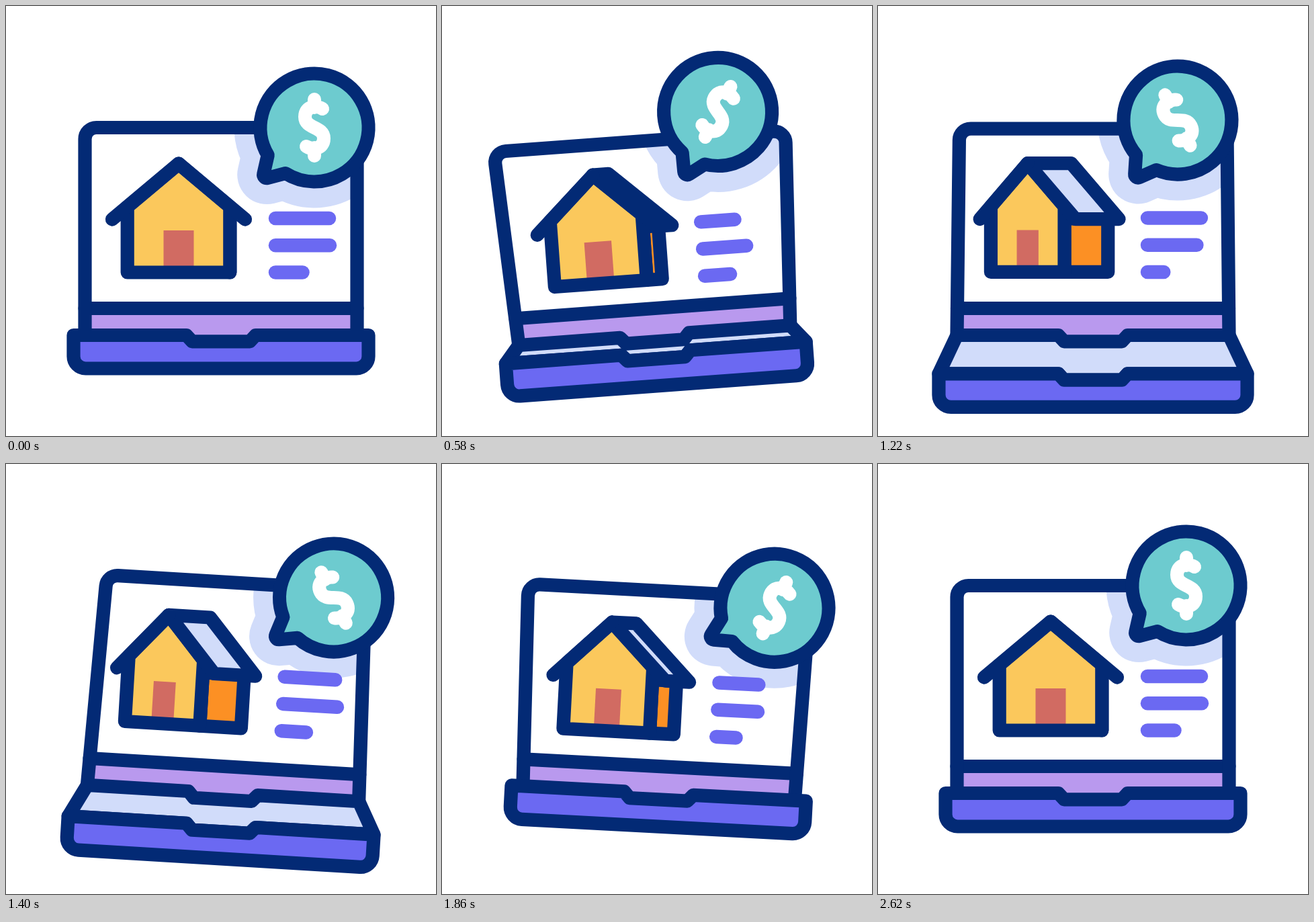
Recreate the animation shown at these times as an HTML page with a canvas. Size 640 by 640 pixels, loop 3000 ms.

```html
<!DOCTYPE html>
<html lang="en">
<head>
<meta charset="utf-8">
<title>Home price on a laptop</title>
<style>
html, body { margin: 0; width: 100%; height: 100%; overflow: hidden; background: #fff; }
canvas { display: block; width: 100vw; height: 100vh; }
</style>
</head>
<body>
<canvas id="stage" width="640" height="640"></canvas>
<script>
const ctx = document.getElementById('stage').getContext('2d');
const LOOP = 3000, RAD = Math.PI / 180, PEN = 20.2;
const NAVY = '#032a75', PURPLE = '#6b69f2', LILAC = '#b999ee', PALE = '#d1dcfa',
  TEAL = '#6dcbcf', YELLOW = '#fbc85c', ORANGE = '#fc9024', DOOR = '#d16b62';

// Cosine ease through a few poses, each [time, value]; starts from zero.
const ease = (start, ...poses) => t => {
  let from = start, value = 0;
  for (const [to, next] of poses) {
    if (t < to) {
      const u = Math.max(0, (t - from) / (to - from));
      return value + (next - value) * (1 - Math.cos(Math.PI * u)) / 2;
    }
    from = to;
    value = next;
  }
  return value;
};

// Laptop: a lean to each side, the lid's perspective, the keyboard depth
const tilt = ease(200, [800, -5.95], [1600, 5.05], [2200, 0]);
const flare = ease(200, [800, 21.5], [1400, -9.7], [2000, 10], [2620, 0]);
const drop = ease(200, [800, 27.5], [1400, -5], [2000, 10], [2620, 0]);
const depth = ease(200, [920, 47.5], [1240, 57.5], [1840, 0]);
// The bubble follows the lean a little later; the coin sign swings by itself
const sway = ease(200, [900, -24.6], [1700, 19.8], [2300, 0]);
const coin = ease(200, [750, 34], [1300, -29.5], [1900, 25], [2600, 0]);
const turn = ease(240, [1080, 1], [1200, 1], [2620, 0]);

// Each text bar shrinks twice, the lower ones later
const bars = [80, 81, 40.5].map((len, i) => {
  const dip = 17 + len * 0.23, late = i * 140;
  const cut = ease(200 + late, [720 + late, dip], [1240 + late, 0], [1790 + late, dip * 0.62], [2340 + late, 0]);
  return t => len - cut(t);
});

function line(points, close) {
  ctx.beginPath();
  points.forEach(([x, y]) => ctx.lineTo(x, y));
  if (close) ctx.closePath();
}
function fill(color) {
  ctx.fillStyle = color;
  ctx.fill();
}
function stroke(color = NAVY, width = PEN) {
  ctx.strokeStyle = color;
  ctx.lineWidth = width;
  ctx.stroke();
}
function shape(points, color) {
  line(points, true);
  fill(color);
  stroke();
}
function spin(x, y, deg) {
  ctx.translate(x, y);
  ctx.rotate(deg * RAD);
  ctx.translate(-x, -y);
}

const notch = y => [[268.5, y], [277, y + 9.3], [363, y + 9.3], [371.5, y]];

function screenPath(out, top) {
  const mid = 320 - out * 0.07, half = 202.5 + out;
  ctx.beginPath();
  ctx.moveTo(117.5, 490);
  ctx.arcTo(mid - half, top, mid + half, top, 17);
  ctx.arcTo(mid + half, top, 522.5, 490, 17);
  ctx.lineTo(522.5, 490);
}

function bubblePath() {
  ctx.beginPath();
  ctx.arc(459, 181, 80.5, 149.4 * RAD, 122.3 * RAD);
  ctx.arcTo(381.5, 258, 389.7, 222, 5);
  ctx.closePath();
}

function drawHouse(p, lean) {
  const cx = 257 - 34.3 * p - lean * 0.25, s = 1 - 0.282 * p, side = 64.8 * p;
  const at = (dx, y, back = 0) => [cx + dx * s + back, y];
  const wall = 76.3, eave = 99;
  shape([at(wall, 317), at(wall, 317, side), at(wall, 396.5, side), at(wall, 396.5)], ORANGE);
  const front = [at(0, 235), at(wall, 299), at(wall, 396.5), at(-wall, 396.5), at(-wall, 299)];
  line(front, true);
  fill(YELLOW);
  line([at(-22.5, 334), at(22.5, 334), at(22.5, 392), at(-22.5, 392)], true);
  fill(DOOR);
  line(front, true);
  stroke();
  shape([at(0, 234.6), at(0, 234.6, side), at(eave, 317.6, side), at(eave, 317.6)], PALE);
  line([at(0, 234.6), at(-eave, 317.6)]);
  stroke();
}

function drawBase(d) {
  const out = d * 0.175, l = 100.5 - out, r = 539.5 + out, y = 490 + d, b = y + 49.5;
  const front = [[l, y], ...notch(y), [r, y]];
  if (d > 0.1) {
    line([[117.5, 490], ...notch(490), [522.5, 490], ...front.slice().reverse()], true);
    fill(PALE);
    stroke();
  }
  line(front);
  ctx.arcTo(r, b, l, b, 18);
  ctx.arcTo(l, b, l, y, 18);
  ctx.closePath();
  fill(PURPLE);
  stroke();
}

function drawDollar() {
  ctx.beginPath();
  ctx.moveTo(12, -28);
  ctx.bezierCurveTo(4, -33, -14, -33, -14, -16);
  ctx.bezierCurveTo(-14, 2, 14, -2, 14, 16);
  ctx.bezierCurveTo(14, 33, -4, 33, -12, 28);
  ctx.moveTo(0, -42);
  ctx.lineTo(0, -30);
  ctx.moveTo(0, 30);
  ctx.lineTo(0, 42);
  stroke('#fff', 20);
}

function draw(t) {
  const lean = tilt(t), out = flare(t), fall = drop(t), swing = sway(t);
  const top = 181 + fall, edge = out * 40 / (490 - top);

  ctx.setTransform(1, 0, 0, 1, 0, 0);
  ctx.fillStyle = '#fff';
  ctx.fillRect(0, 0, 640, 640);
  ctx.lineCap = ctx.lineJoin = 'round';
  spin(320, 540, lean);

  // Pale halo of the bubble, kept inside the screen
  ctx.save();
  screenPath(out, top);
  ctx.clip();
  spin(384, 257, swing);
  bubblePath();
  fill(PALE);
  stroke(PALE, 78);
  ctx.restore();

  ctx.save();
  ctx.translate(0, (out + fall) * 0.31);
  drawHouse(turn(t), lean);
  bars.forEach((bar, i) => {
    const y = 316 + i * 40.3;
    line([[401, y], [401 + bar(t), y]]);
    stroke(PURPLE, 20.5);
  });
  ctx.restore();

  const sill = [[117.5 - edge, 450], [522.5 + edge, 450]];
  line([...sill, [522.5, 490], ...notch(490).reverse(), [117.5, 490]], true);
  fill(LILAC);
  line(sill);
  stroke();
  screenPath(out, top);
  stroke();
  drawBase(depth(t));

  spin(384, 257, swing);
  bubblePath();
  fill(TEAL);
  stroke();
  ctx.translate(459, 181);
  ctx.rotate((coin(t) - lean - swing) * RAD);
  drawDollar();
}

function tick() {
  draw(performance.now() % LOOP);
  requestAnimationFrame(tick);
}
tick();
</script>
</body>
</html>
```
